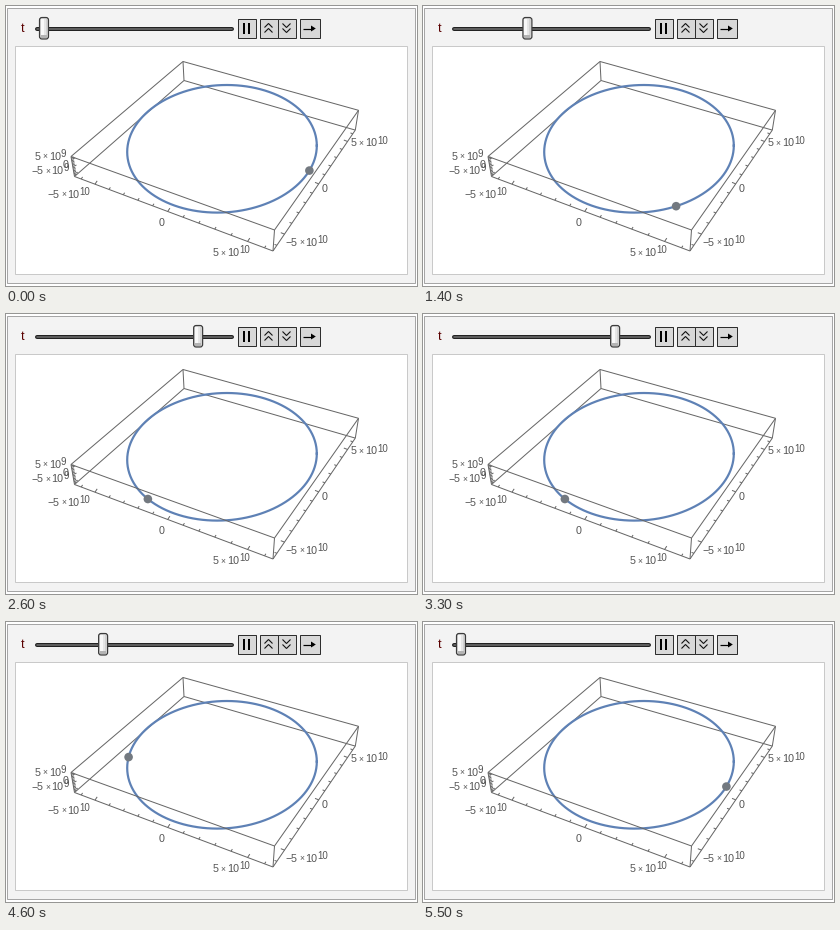
Recreate the animation shown at these times as a matplotlib script. Size 411x280 px, loop 6000 ms.

```python
import numpy as np
import matplotlib.pyplot as plt
from matplotlib.animation import FuncAnimation
from matplotlib.patches import Circle, FancyBboxPatch, Polygon, Rectangle
from matplotlib.transforms import Affine2D

W, H, DPI = 411, 280, 64
FRAMES, INTERVAL = 60, 100
PT = 72 / DPI  # points per pixel

FONT = "Liberation Sans"
EDGE, INK, ORBIT, BODY = "#666666", "#555555", "#5e81b5", "#737980"

fig = plt.figure(figsize=(W / DPI, H / DPI), dpi=DPI, facecolor="white")
ax = fig.add_axes([0, 0, 1, 1])
# Pixel centres lie on whole numbers, counted from 1.
ax.set_xlim(0.5, W + 0.5)
ax.set_ylim(H + 0.5, 0.5)
ax.axis("off")


def line(points, color=EDGE, width=1.0, z=1, cap="butt"):
    xs, ys = zip(*points)
    ax.plot(xs, ys, color=color, lw=width * PT, zorder=z,
            solid_capstyle=cap, solid_joinstyle="miter")


def box(x0, y0, x1, y1, fill, edge, z=0):
    ax.add_patch(Rectangle((x0, y0), x1 - x0, y1 - y0, fc=fill, ec=edge,
                           lw=PT, zorder=z))


def text(x, y, s, size=10.7, color=INK, ha="left"):
    ax.text(x, y, s, family=FONT, fontsize=size * PT, color=color,
            ha=ha, va="baseline", zorder=5)


def power_label(x, y, exponent, negative=False):
    """Write 5 x 10^exponent with its left end at x and baseline at y."""
    if negative:
        text(x, y, "\u2212")
        x += 6
    text(x, y, "5")
    text(x + 10.6, y - 0.4, "\u00d7", 8.5, ha="center")
    text(x + 14.6, y, "10")
    text(x + 26.4, y - 2.8, str(exponent), 9.7)


# ---- Panel and controls ----
def draw_panel():
    box(1, 2, 409, 277, "#f3f3f3", "#a6a6a6")
    box(9, 40, 401, 268, "white", "#c9c9c9")
    text(15.3, 26, "t", 12.5, "#5a0000")


def chevron(x, y, direction):
    for dy in (-2.5, 2.5):
        tip = y + dy - 2 * direction
        base = y + dy + 2 * direction
        line([(x - 4, base), (x, tip), (x + 4, base)], "#111111", 1.1, 4)


def draw_buttons():
    for left, right in ((232, 250), (254, 272), (272, 290), (294, 314)):
        box(left, 13, right, 32, "#d8d8d8", "#2e2e2e", 2)
    for x in (238.5, 243.5):
        line([(x, 17.5), (x, 28.5)], "black", 2, 4)
    chevron(263, 22.5, 1)
    chevron(281, 22.5, -1)
    line([(297.5, 23), (307, 23)], "black", 1.2, 4)
    ax.add_patch(Polygon([(305.5, 20), (310.3, 23), (305.5, 26)],
                         fc="black", ec="none", zorder=4))


def draw_slider():
    line([(31, 23.5), (226, 23.5)], "#222222", 4, 2, "round")
    line([(31, 23.5), (226, 23.5)], "#6c6c6c", 1.6, 3, "round")
    shift = Affine2D()
    moving = shift + ax.transData
    ax.add_patch(FancyBboxPatch((-4.5, 12), 9, 21.5,
                                boxstyle="round,pad=0,rounding_size=2.5",
                                fc="#d2d2d2", ec="#3c3c3c", lw=1.2 * PT,
                                transform=moving, zorder=6))
    for x, y, w, h, color in ((-3, 13.5, 3, 17, "#f8f8f8"),
                              (0, 13.5, 2, 17, "#e6e6e6"),
                              (-3, 29.5, 6, 2.5, "#b4b4b4")):
        ax.add_patch(Rectangle((x, y), w, h, fc=color, ec="none",
                               transform=moving, zorder=7))
    return shift


# ---- Box with axes; corners in order left, front, right, back ----
TOP = [(65.5, 151), (269, 224.5), (353, 104.8), (177.5, 56)]
BOTTOM = [(69, 171), (267.5, 245.5), (349.8, 124.6), (178.5, 75)]


def draw_box():
    for ring in (TOP, BOTTOM):
        for i in range(4):
            line([ring[i], ring[(i + 1) % 4]], z=3 if i < 2 else 1)
    for i in range(4):
        line([TOP[i], BOTTOM[i]], z=3 if i < 3 else 1)


def along(a, b, u, depth):
    """Point at fraction u of an edge; depth is the far/near end ratio."""
    k = u / (u + (1 - u) * depth)
    return a[0] + (b[0] - a[0]) * k, a[1] + (b[1] - a[1]) * k


def draw_ticks(a, b, depth, step, reach, direction, sizes):
    dx, dy = direction
    for k in range(-reach, reach + 1):
        x, y = along(a, b, 0.5 + step * k, depth)
        size = sizes[0] if k % 5 == 0 else sizes[1]
        line([(x, y), (x + dx * size, y + dy * size)], z=3)


def draw_axes():
    left, front, right, _ = BOTTOM
    draw_ticks(left, front, 1.13, 0.077, 6, (0.55, -0.83), (4, 2.5))
    draw_ticks(front, right, 0.80, 0.077, 6, (-0.93, -0.36), (4, 2.5))
    draw_ticks(left, TOP[0], 1.0, 0.072, 6, (0.93, -0.36), (4, 2.5))
    power_label(29, 154, 9)
    text(60.5, 162, "0", ha="center")
    power_label(25.5, 168.5, 9, True)
    power_label(41.5, 192, 10, True)
    text(156.2, 220, "0", ha="center")
    power_label(207, 250.5, 10)
    power_label(279.5, 240, 10, True)
    text(319.2, 186.2, "0", ha="center")
    power_label(345.3, 141, 10)


# ---- Orbit ----
def ellipse(phi):
    x = 216.5 + 94.8 * np.cos(phi)
    y = 143.3 + 63.8 * (0.9987 * np.sin(phi) - 0.05 * np.cos(phi))
    return x, y


def orbit_point(theta):
    """Screen position for an orbit angle, with perspective foreshortening."""
    half = (theta - np.radians(117.9)) / 2
    seen = 2 * np.arctan2(0.8978 * np.sin(half), np.cos(half))
    return ellipse(np.radians(-89.5) - seen)


draw_panel()
draw_buttons()
thumb_shift = draw_slider()
draw_box()
draw_axes()
ax.plot(*ellipse(np.linspace(0, 2 * np.pi, 361)), color=ORBIT,
        lw=2.2 * PT, zorder=2)
body = Circle((0, 0), 4.3, fc=BODY, ec="none", zorder=4)
ax.add_patch(body)


def update(frame):
    # Forward for half the loop, then back; the start is held at zero.
    step = max(0.0, min(frame, FRAMES - 1 - frame) - 4.915)
    thumb_shift.clear().translate(38.5 + 7.31 * step, 0)
    body.center = orbit_point(np.radians(114.375 * step))
    return ()


anim = FuncAnimation(fig, update, frames=FRAMES, interval=INTERVAL,
                     repeat=True, repeat_delay=0, blit=False)
plt.show()
```
